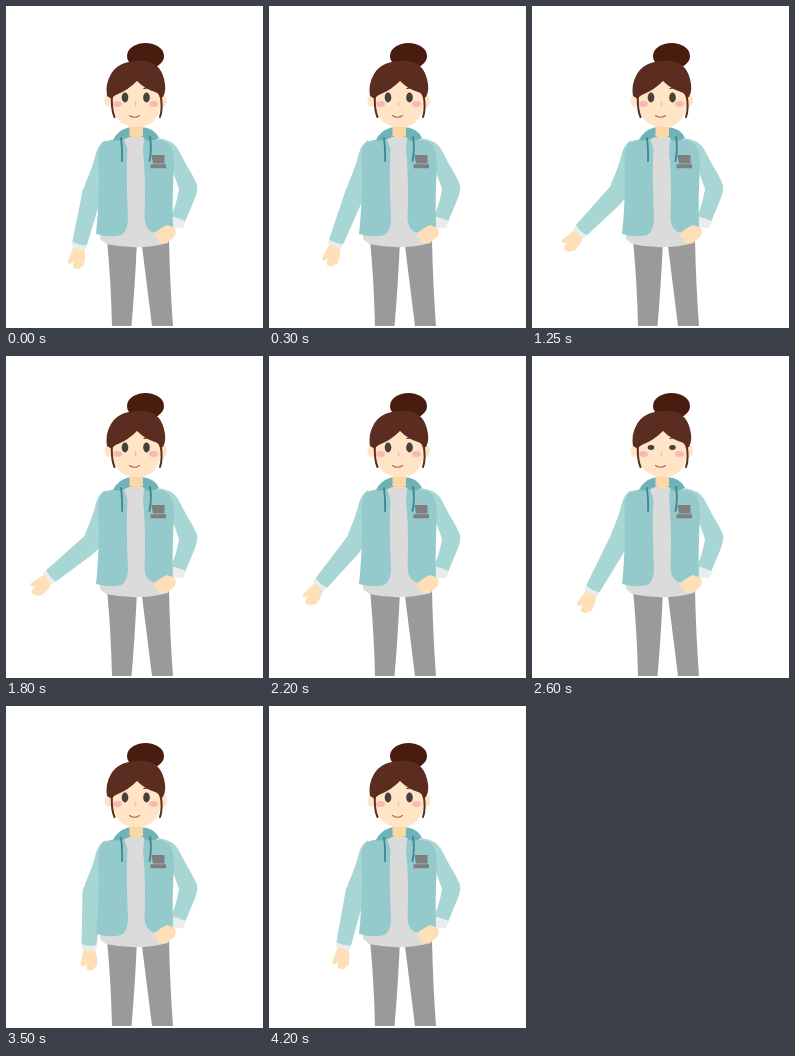
Animation, 257 px wide and 322 px high, one loop 4250 ms. Source, as an HTML page:

```html
<!DOCTYPE html>
<html lang="en">
<head>
<meta charset="utf-8">
<title>Woman waving her arm</title>
<style>
html, body { margin: 0; height: 100%; overflow: hidden; background: #fff; }
svg { display: block; width: 100vw; height: 100vh; }
.face { fill: #ffe5c6; }
.hand { fill: #fedfb8; }
.neck { fill: #fbd7a5; }
.jacket { fill: #94cacb; }
.sleeve { fill: #a8d6d5; }
.cuff { fill: #e9eded; }
.hood { fill: #6fb2b7; }
.shirt { fill: #dbdbdc; }
.trousers { fill: #9a9a9a; }
.hair { fill: #5b2d20; }
.bun { fill: #481c0f; }
.badge { fill: #7f7f80; }
.cheek { fill: #f9b8b4; }
.eye { fill: #49403e; }
.line { fill: none; stroke-linecap: round; }
</style>
</head>
<body>
<svg viewBox="0 0 257 322">
  <!-- trousers -->
  <path class="trousers" d="M101 234H131Q129 280 125.500 320H106Q105 276 101 234ZM131 234H163Q164 280 167 320H146L136 240Z"/>

  <!-- swinging arm -->
  <path class="sleeve" d="M99 134Q92 139 90 147Q87 160 79 178L78 188H97Z"/>
  <g id="forearm">
    <path class="hand" d="M-5 56Q-6 64-7 70Q-8 75-5 75Q-3 75-2 71L-1 77Q1 80 3 78Q6 79 7 75Q10 74 9 69Q9 63 5 56Z"/>
    <path class="cuff" d="M-7 50H7L7.500 57Q0 60-7.500 57Z"/>
    <path class="sleeve" d="M-9.500 0A9.500 9.500 0 0 1 9.500 0L10 8L7.500 53Q0 55-7.500 53Z"/>
  </g>

  <!-- arm on the hip -->
  <path class="sleeve" d="M152 132Q167 134 172 143L181 160Q188 171 191 179Q192 184 189 192L179 216L165 211Q171 196 173 183L166 163Z"/>
  <path class="cuff" d="M164.500 210Q173 212 180 215L177 222Q170 223 161 219Z"/>

  <!-- shirt and jacket -->
  <path class="shirt" d="M118 129H141V222L165 221L162 237Q132 245 100 238L94 233V226L119 224Z"/>
  <path class="jacket" d="M118 133Q104 133 98 136Q92 141 92.500 152Q94 192 90 228Q104 232 115 229Q122 226 122 212Q120 170 121.500 143ZM138 133Q155 132 163 138Q168 145 168 160Q166 190 167 224Q156 228 146 226Q139 223 138.500 212Q140 172 137 145Z"/>
  <path class="hand" d="M148 228Q152 223 161 219L169 222Q172 230 164 234Q160 238 154 237Q150 237 152 231Q148 232 148 228Z"/>

  <!-- neck, hood and cords -->
  <path class="hood" d="M122 121.500H139Q150 124 153 132Q146 136 140 134L137 131H123Q114 136 107 134Q111 125 122 121.500Z"/>
  <path class="neck" d="M123.500 116H137V130Q130 134 123.500 130Z"/>
  <path class="line" stroke="#3f858f" stroke-width="1.800" d="M115 132Q116.500 143 116 155M144 131Q146 143 143.500 155"/>

  <!-- badge -->
  <path class="badge" d="M145.500 149H158.500V157.500H147ZM144.500 158.300H160V162.300H144.500Z"/>

  <!-- head -->
  <ellipse class="bun" cx="139.500" cy="50" rx="18.500" ry="13"/>
  <g class="face">
    <ellipse cx="102.500" cy="95" rx="4" ry="6"/>
    <ellipse cx="157" cy="95" rx="4" ry="6"/>
    <path d="M106 76H155V96Q153 121 130.500 121Q108 121 106 96Z"/>
  </g>
  <path class="hair" d="M130 55Q153 52 158 73Q161 84 157 91L154 92Q153 87 149 86Q139 83 131 75Q122 84 112 88Q107 90 106 93L101 90Q99 78 105 68Q112 56 130 55Z"/>
  <path class="line" stroke="#5b2d20" stroke-width="2" d="M106 88Q105 103 108.500 111M154.500 88Q157 103 154 111"/>
  <path class="line" stroke="#5b2d20" stroke-width="1.200" d="M114 83.500Q117 81 121 82.500M138 82.500Q142 81 145 83.500"/>
  <ellipse class="cheek" cx="111.500" cy="98" rx="4.500" ry="3"/>
  <ellipse class="cheek" cx="147.500" cy="98" rx="4.500" ry="3"/>
  <g class="eye">
    <ellipse cx="119" cy="91.500" rx="3.300" ry="5"/>
    <ellipse cx="140.500" cy="91.500" rx="3.300" ry="5"/>
  </g>
  <path class="line" stroke="#f3bfb0" stroke-width="1.600" d="M129.500 96V100"/>
  <path class="line" stroke="#b0694f" stroke-width="1.100" d="M123.500 109.500Q128.500 113 133.500 109.500"/>
</svg>
<script>
const LOOP = 4250, RAISED = 1675, LOWERED = 3650;
const BLINK = 2700, BLINK_HALF = 200;
const LOW = -1, HIGH = 54; // forearm angle in degrees
const forearm = document.getElementById('forearm');
const eyes = document.querySelectorAll('.eye ellipse');

function armAngle(t) {
  const falling = t >= RAISED && t < LOWERED;
  const lift = falling
    ? (LOWERED - t) / (LOWERED - RAISED)
    : ((t - LOWERED + LOOP) % LOOP) / (RAISED - LOWERED + LOOP);
  return LOW + (HIGH - LOW) * lift;
}

function draw(now) {
  const t = now % LOOP;
  forearm.setAttribute('transform', `translate(86 186) rotate(${armAngle(t)})`);
  const open = Math.min(1, Math.max(0.12, Math.abs(t - BLINK) / BLINK_HALF));
  for (const eye of eyes) eye.setAttribute('ry', 5 * open);
  requestAnimationFrame(draw);
}
draw(0);
</script>
</body>
</html>
```
